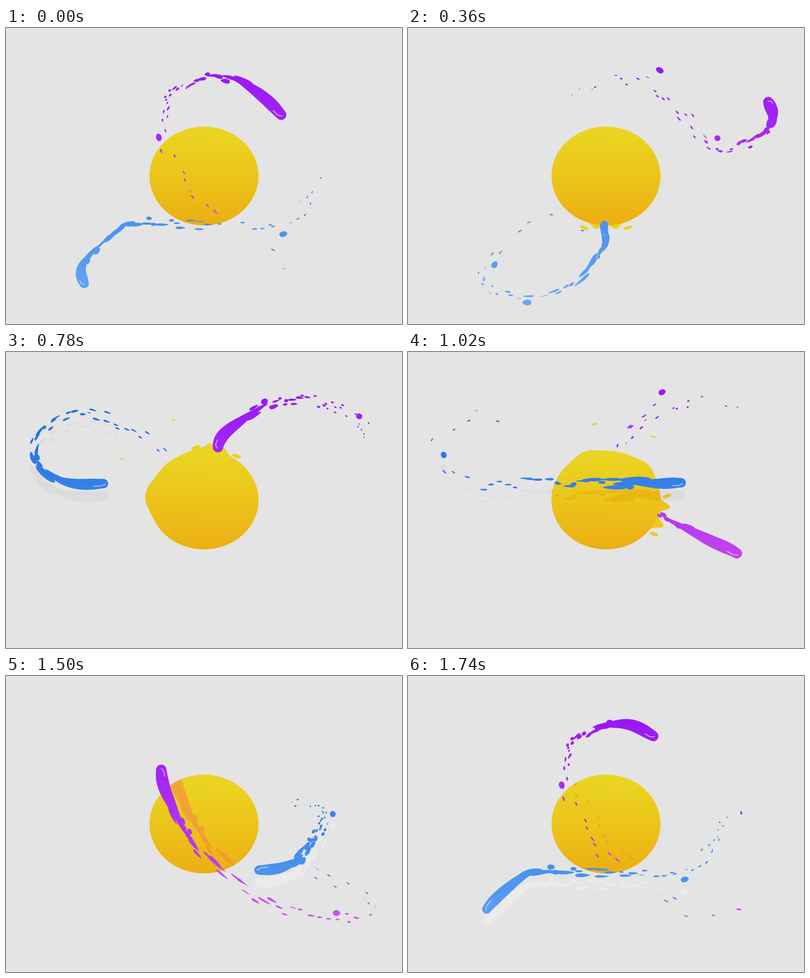
Recreate the animation shown at these times as an HTML page with a canvas. Size 800x600 px, loop 1800 ms.

```html
<!DOCTYPE html>
<html lang="en">
<head>
<meta charset="utf-8">
<title>Liquid orbit</title>
<style>
  html, body { margin: 0; width: 100%; height: 100%; overflow: hidden; background: #e4e4e4; }
  canvas { display: block; width: 100vw; height: 100vh; }
</style>
</head>
<body>
<canvas width="800" height="600"></canvas>
<script>
const ctx = document.querySelector('canvas').getContext('2d');
const LOOP = 1800, STEP = 60, STEPS = 29;
const TAU = Math.PI * 2, DEGREE = Math.PI / 180;
const mod = n => ((n % STEPS) + STEPS) % STEPS;
const random = i => { const v = Math.sin(i * 12.9898 + 4.1) * 43758.5453; return v - Math.floor(v); };

function verticalGradient(y0, y1, ...colors) {
  const g = ctx.createLinearGradient(0, y0, 0, y1);
  colors.forEach((c, i) => g.addColorStop(i / (colors.length - 1), c));
  return g;
}
const ballPaint = verticalGradient(200, 400, '#ead622', '#ebc51a', '#ecae12');
const splashPaint = verticalGradient(200, 400, '#e9d523', '#ecc11a', '#e8d322');
const ball = new Path2D();
ball.ellipse(400, 300, 110, 100, 0, 0, TAU);

// Key points are [step, x, y]; liquid inside the ball is hidden.
const purple = {
  seed: 11, size: 1, reach: 1.75, hidden: [12.05, 14.1],
  paint: verticalGradient(90, 500, '#9818f6', '#b032f2', '#cf52ee'),
  keys: [[0, 556, 176], [1.5, 625, 244], [3, 720, 213], [5, 728, 150], [8, 633, 103], [10, 535, 105],
    [12, 428, 193], [14, 503, 322], [16, 664, 409], [17.5, 744, 478], [19, 670, 490], [20.5, 540, 465],
    [22, 385, 345], [24, 313, 190], [26, 360, 112], [27, 430, 97], [28, 496, 121]]
};
const blue = {
  seed: 503, size: .9, reach: 1.45, hidden: [4.05, 5.95],
  paint: verticalGradient(110, 550, '#1c6be2', '#3f89ea', '#66a8f2'),
  keys: [[0, 158, 518], [1, 205, 545], [2, 300, 537], [3, 383, 468], [4, 397, 402], [6, 327, 209],
    [8, 169, 123], [9, 92, 145], [10, 54, 205], [11, 108, 260], [12, 197, 267], [16, 552, 266],
    [18, 632, 272], [20, 642, 295], [22, 612, 340], [23, 582, 378], [24, 511, 394],
    [26, 325, 397], [27, 238, 403], [28, 160, 473]]
};

// Where the streams pierce the ball's rim.
const impacts = [
  { start: 4, angle: 90, height: .1 },
  { start: 6, angle: -130, height: .36 },
  { start: 11.4, angle: -77, height: .1 },
  { start: 15, angle: 17, height: .2 }
];
const IMPACT_LIFE = 7;

// Position on the smooth closed path, moved sideways by `offset`.
function locate({ keys }, step, offset = 0) {
  const u = mod(step), count = keys.length;
  const key = i => {
    const [t, x, y] = keys[(i + count) % count];
    return [t + Math.floor(i / count) * STEPS, x, y];
  };
  const i = keys.findLastIndex(k => k[0] <= u);
  const [a, b, c, d] = [-1, 0, 1, 2].map(k => key(i + k));
  const span = c[0] - b[0], f = (u - b[0]) / span;
  const [[x, dx], [y, dy]] = [1, 2].map(k => {
    const m0 = (c[k] - a[k]) / (c[0] - a[0]) * span, m1 = (d[k] - b[k]) / (d[0] - b[0]) * span;
    const p = 3 * (c[k] - b[k]) - 2 * m0 - m1, q = 2 * (b[k] - c[k]) + m0 + m1;
    return [b[k] + f * (m0 + f * (p + f * q)), m0 + f * (2 * p + 3 * f * q)];
  });
  const length = Math.hypot(dx, dy) || 1;
  return { x: x - dy / length * offset, y: y + dx / length * offset };
}

const isHidden = (stream, u) => mod(u) > stream.hidden[0] && mod(u) < stream.hidden[1];

function addDisc(path, stream, u, radius, offset) {
  if (isHidden(stream, u) || radius < .3) return;
  const { x, y } = locate(stream, u, offset);
  path.moveTo(x + radius, y);
  path.arc(x, y, radius, 0, TAU);
}

function addBody(path, stream, n) {
  const { size, reach } = stream;
  for (let age = 0; age < reach; age += .025) {
    const part = age / reach;
    const swell = 10.5 + 3 * Math.sin(Math.PI * Math.min(1, part * 1.3));
    const taper = Math.min(1, 1.1 * Math.sqrt(1 - part));
    addDisc(path, stream, n - age, swell * taper * size, Math.sin((n - age) * 5));
  }
}

// Droplets are torn off the tail as long strands and shrink to dots; a few are heavy and fly off.
function addDrops(path, stream, n) {
  const perStep = 7;
  for (let i = 0; i < STEPS * perStep; i++) {
    const rnd = k => random(stream.seed + i * 7 + k);
    const u = (i + rnd(0)) / perStep, age = mod(n - u);
    const heavy = i % 31 === 9;
    const life = heavy ? 9 : 3 + 6.5 * rnd(1);
    if (age < stream.reach * .65 || age > life) continue;
    const fresh = Math.exp(-.6 * Math.max(0, age - 1.2));
    const fade = Math.min(1, life - age + .3);
    const radius = heavy ? 5.5 * fade : (1.2 + 3.8 * fresh * (.3 + rnd(3))) * fade;
    const half = heavy ? .07 : .04 + .34 * fresh * rnd(4);
    const offset = (rnd(2) - .5) * (heavy ? 13 * age : 13 + 3 * age);
    for (let k = -1; k <= 1; k += .1) {
      addDisc(path, stream, u + k * half, radius * Math.sqrt(1 - k * k) * (1 + .35 * k), offset);
    }
  }
}

function liquid(stream, n) {
  const path = new Path2D();
  addBody(path, stream, n);
  addDrops(path, stream, n);
  return path;
}

const onRim = (degrees, reach) =>
  [400 + 110 * reach * Math.cos(degrees * DEGREE), 300 + 100 * reach * Math.sin(degrees * DEGREE)];

// Each impact sends two waves apart along the rim and throws two drops outwards.
function drawSplashes(n) {
  const active = impacts.map(hit => ({ ...hit, age: mod(n - hit.start) })).filter(hit => hit.age < IMPACT_LIFE);
  const waves = active.flatMap(({ angle, height, age }) => [-1, 1].map(side => ({
    angle: angle + side * (3 + 7 * age),
    width: 1.8 + 1.6 * age,
    height: height * Math.sin(Math.PI * Math.sqrt(age / IMPACT_LIFE))
  })));
  ctx.fillStyle = splashPaint;
  ctx.beginPath();
  for (let degrees = -180; degrees < 180; degrees++) {
    const lift = waves.reduce((sum, wave) => {
      const gap = (degrees - wave.angle + 540) % 360 - 180;
      return sum + wave.height * Math.exp(-((gap / wave.width) ** 2) / 2);
    }, 0);
    ctx.lineTo(...onRim(degrees, 1 + lift));
  }
  ctx.fill();

  for (const { angle, age } of active) {
    for (const side of [-1, 1]) {
      const degrees = angle + side * 21;
      const [x, y] = onRim(degrees, 1 + .12 * age);
      const shrink = 1 - age / IMPACT_LIFE;
      ctx.beginPath();
      ctx.ellipse(x, y, 3 + 7 * shrink, 1 + 3 * shrink, side * .3, 0, TAU);
      ctx.fill();
    }
  }
}

function fillShifted(path, dx, dy, color, clip) {
  ctx.save();
  if (clip) ctx.clip(clip);
  ctx.translate(dx, dy);
  ctx.fillStyle = color;
  ctx.fill(path);
  ctx.restore();
}

function drawHighlight(stream, n) {
  if (isHidden(stream, n)) return;
  ctx.beginPath();
  for (let age = -.04; age < .26; age += .03) {
    const p = locate(stream, n - age, 5.5 * stream.size * Math.min(1, (age + .06) * 8));
    ctx.lineTo(p.x, p.y);
  }
  ctx.strokeStyle = 'rgba(240, 236, 250, .85)';
  ctx.lineWidth = 1.4;
  ctx.lineCap = 'round';
  ctx.stroke();
}

function draw(time) {
  const n = Math.max(0, Math.floor(time % LOOP / STEP) - 1);
  const purplePath = liquid(purple, n), bluePath = liquid(blue, n);

  ctx.fillStyle = '#e4e4e4';
  ctx.fillRect(0, 0, 800, 600);
  if (n >= 10) fillShifted(bluePath, 0, 25, n < 18 ? '#dcdcdc' : '#ebebeb');

  drawSplashes(n);
  ctx.fillStyle = ballPaint;
  ctx.fill(ball);

  if (n >= 10 && n < 24) fillShifted(bluePath, 0, 25, 'rgba(230, 130, 0, .25)', ball);
  if (n >= 19) fillShifted(purplePath, 25, -6, 'rgba(246, 125, 78, .5)', ball);

  for (const [stream, path] of [[purple, purplePath], [blue, bluePath]]) {
    fillShifted(path, 0, 0, stream.paint);
    drawHighlight(stream, n);
  }
}

const began = performance.now();
function tick() {
  draw(performance.now() - began);
  requestAnimationFrame(tick);
}
tick();
</script>
</body>
</html>
```
